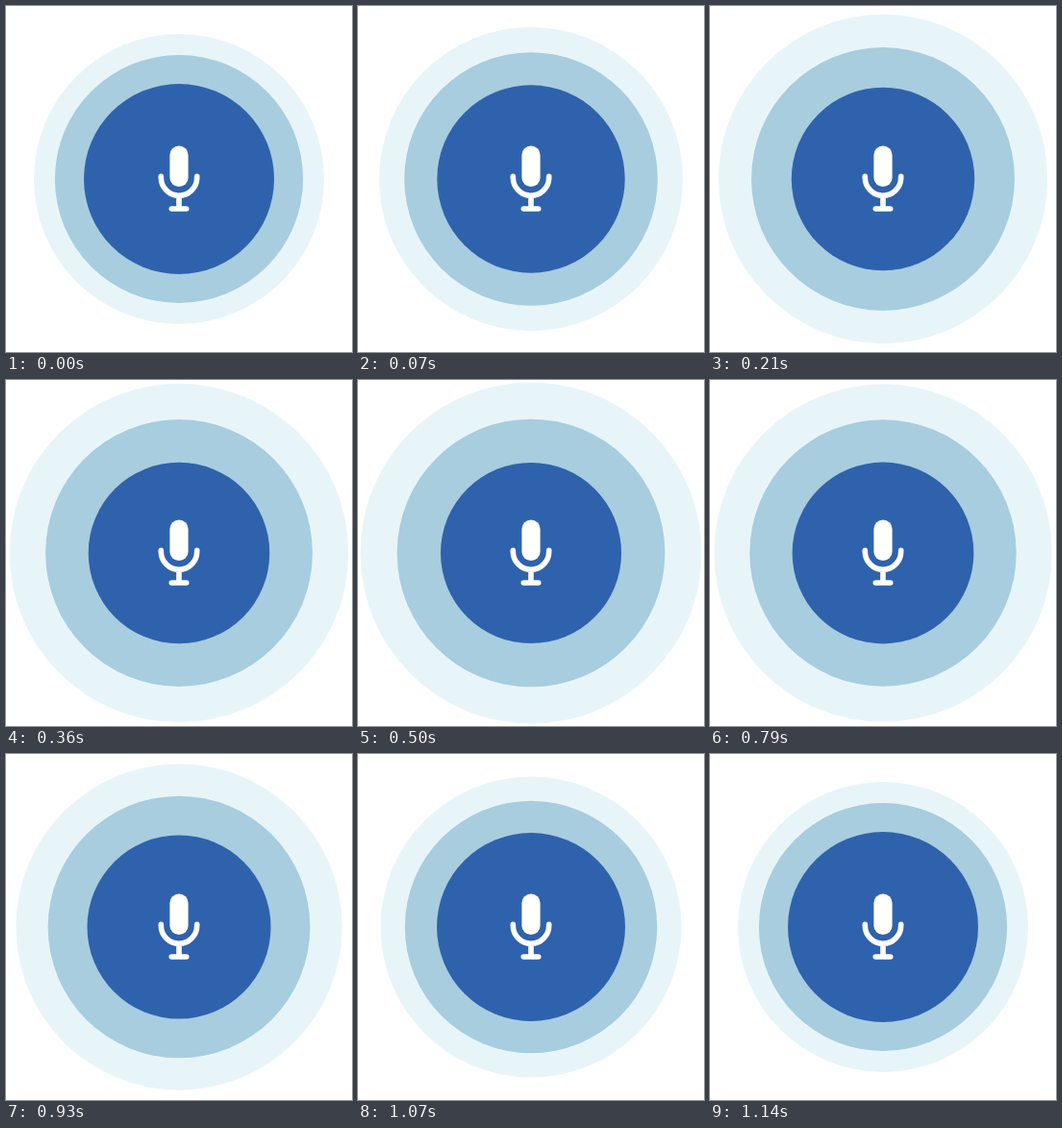
Recreate the animation shown at these times as an HTML page. Size 360 px wide and 360 px high, loop 1.21 s.

```html
<!DOCTYPE html>
<html lang="en">
<head>
<meta charset="utf-8">
<title>Microphone pulse</title>
<style>
  html, body { margin: 0; width: 100%; height: 100%; overflow: hidden; background: #fff; }
  svg { display: block; width: 100vw; height: 100vh; }
</style>
</head>
<body>
<svg viewBox="0 0 360 360">
  <circle id="halo" cx="180" cy="180" r="151" fill="#e8f5f8"/>
  <circle id="ring" cx="180" cy="180" r="129" fill="#a7cddf"/>
  <circle id="disc" cx="180" cy="180" r="99" fill="#2f62ac"/>
  <rect x="170.4" y="145.5" width="19.2" height="42.6" rx="9.6" fill="#fff"/>
  <path d="M161.3 177.4V178.5A18.7 18.7 0 0 0 198.7 178.5V177.4M180 198V211M172.3 211H187.7"
        fill="none" stroke="#fff" stroke-width="5.6" stroke-linecap="round"/>
</svg>
<script>
  const LOOP = 1210, STEPS = 16;
  const circles = [
    { id: 'halo', rest: 151, full: 177.8 },
    { id: 'ring', rest: 129.1, full: 139.5 },
    { id: 'disc', rest: 99, full: 94 }
  ];

  // Quick swell from rest, a long hold, then an accelerating return.
  const swell = k =>
    1 - Math.exp(-0.3 * k ** 1.4) - Math.exp(-0.23 * (STEPS - k) ** 1.5);

  function draw(now) {
    // The motion advances in steps of 70 or 80 ms.
    const tick = Math.floor(now % LOOP / 10);
    const p = swell(Math.floor((tick + 0.5) / 7.14));
    for (const { id, rest, full } of circles)
      document.getElementById(id).setAttribute('r', rest + (full - rest) * p);
  }

  const start = performance.now();
  function loop() {
    draw(performance.now() - start);
    requestAnimationFrame(loop);
  }
  loop();
</script>
</body>
</html>
```
